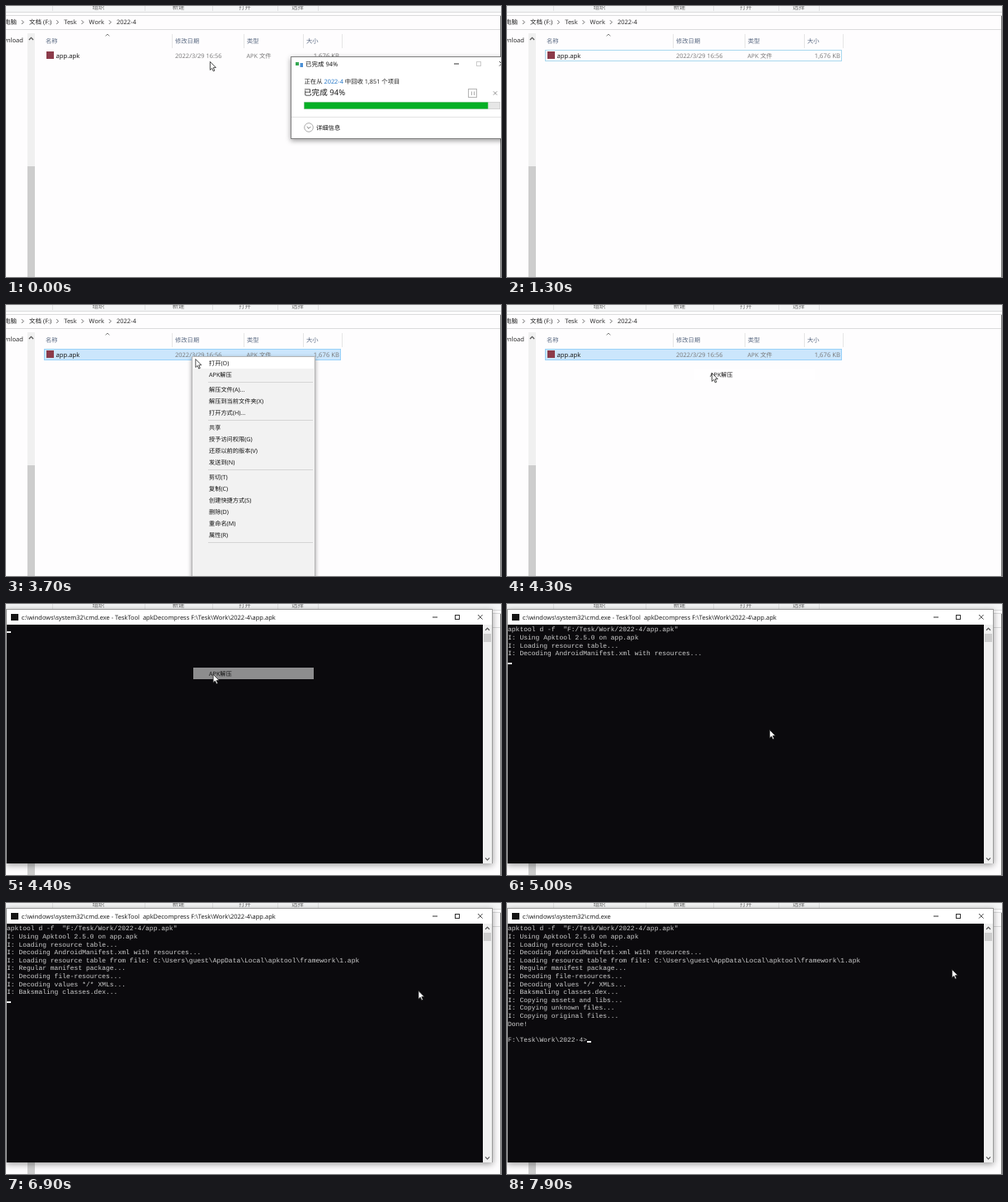
These frames come from a looping animation (600 by 328 pixels, 8000 ms). An HTML page with a canvas:

```html
<!DOCTYPE html>
<html lang="zh-CN">
<head>
<meta charset="utf-8">
<title>APK解压</title>
<style>
html, body { margin: 0; width: 100%; height: 100%; overflow: hidden; background: #fff; }
canvas { display: block; width: 600px; height: 328px; }
</style>
</head>
<body>
<canvas id="stage" width="600" height="328"></canvas>
<script>
const ctx = document.getElementById('stage').getContext('2d');
const LOOP = 8000, STEP = 100;
const UI = '"Open Sans", "Noto Sans CJK SC", "Noto Sans CJK", sans-serif';
const MONO = '"Liberation Mono", monospace';
const LINE = 9.6, CHAR = 4.8, ITEM = 14;
const ARROW = new Path2D('M0 0V10L2.3 7.9 3.9 11.5 5.5 10.8 3.9 7.3 7 7.1Z');

// Pointer stops: time, x, y; it eases from one to the next
const visits = [
  [[0, 247, 67], [600, 248, 60], [1000, 248, 60], [1200, 240, 131]],
  [[2600, 180, 152], [3100, 217, 62], [3600, 226, 62], [4000, 248, 82], [4300, 248, 82], [5200, 328, 162],
   [5700, 331, 166], [6000, 423, 144], [6100, 423, 144], [6600, 497, 107], [7700, 511, 101], [7900, 539, 80]]
];

// Console output in batches; the lines of a batch follow each other at a fixed pace
const batches = [
  { at: 4700, pace: 100, lines: [
    'apktool d -f  "F:/Tesk/Work/2022-4/app.apk"',
    'I: Using Apktool 2.5.0 on app.apk',
    'I: Loading resource table...',
    'I: Decoding AndroidManifest.xml with resources...',
    'I: Loading resource table from file: C:\\Users\\guest\\AppData\\Local\\apktool\\framework\\1.apk'] },
  { at: 5800, pace: 100, lines: ['I: Regular manifest package...', 'I: Decoding file-resources...'] },
  { at: 6200, pace: 400, lines: ['I: Decoding values */* XMLs...', 'I: Baksmaling classes.dex...'] },
  { at: 7200, pace: 50, lines: [
    'I: Copying assets and libs...', 'I: Copying unknown files...', 'I: Copying original files...', 'Done!', ''] }
];
const DONE = 7400;
const PROMPT = 'F:\\Tesk\\Work\\2022-4>';

const menuGroups = [
  ['打开(O)', 'APK解压'],
  ['解压文件(A)...', '解压到当前文件夹(X)', '打开方式(H)...'],
  ['共享', '授予访问权限(G)', '还原以前的版本(V)', '发送到(N)'],
  ['剪切(T)', '复制(C)', '创建快捷方式(S)', '删除(D)', '重命名(M)', '属性(R)']
];

const ease = k => k * k * (3 - 2 * k);

function rect(x, y, w, h, color) {
  ctx.fillStyle = color;
  ctx.fillRect(x, y, w, h);
}

function frame(x, y, w, h, color) {
  ctx.strokeStyle = color;
  ctx.lineWidth = 1;
  ctx.strokeRect(x + .5, y + .5, w - 1, h - 1);
}

function line(points, color, width = .9) {
  ctx.strokeStyle = color;
  ctx.lineWidth = width;
  ctx.beginPath();
  points.forEach(([x, y]) => ctx.lineTo(x, y));
  ctx.stroke();
}

// Chevron around x, y; a negative r points it down
function caret(x, y, r, color, width) {
  line([[x - r, y + r / 2], [x, y - r / 2], [x + r, y + r / 2]], color, width);
}

function cross(x, y, r, color) {
  line([[x - r, y - r], [x + r, y + r]], color);
  line([[x - r, y + r], [x + r, y - r]], color);
}

// Set type at ten times the size and scale down for even spacing; returns the width.
function text(str, x, y, color, size = 7.4, align = 'left', font = UI) {
  ctx.save();
  ctx.translate(x, y);
  ctx.scale(.1, .1);
  ctx.font = `${size * 10}px ${font}`;
  ctx.textRendering = 'geometricPrecision';
  ctx.textAlign = align;
  ctx.fillStyle = color;
  ctx.fillText(str, 0, 0);
  const w = ctx.measureText(str).width / 10;
  ctx.restore();
  return w;
}

function panel(x, y, w, h, fill, edge, blur) {
  ctx.save();
  ctx.shadowColor = 'rgba(0,0,0,.4)';
  ctx.shadowBlur = blur;
  ctx.shadowOffsetY = 2;
  rect(x, y, w, h, fill);
  ctx.restore();
  frame(x, y, w, h, edge);
}

function windowButtons(x, y, maxColor) {
  rect(x - 3, y - .5, 6, 1, '#333');
  frame(x + 24, y - 3, 6, 6, maxColor);
  cross(x + 54.8, y - .2, 2.8, '#333');
}

function explorer(row) {
  rect(0, 0, 600, 328, '#fefdfe');
  rect(0, 0, 600, 7, '#f5f6f7');
  [7, 11, 28].forEach(y => rect(0, y, 600, 1, '#dbdbdc'));

  const tabs = [56, 168, 250, 329, 378];
  tabs.forEach(x => rect(x, 0, 1, 6, '#e0e1e2'));
  ['组织', '新建', '打开', '选择'].forEach((s, i) => text(s, (tabs[i] + tabs[i + 1]) / 2, 3.5, '#666', 7.3, 'center'));

  let x = -9.5;
  ['此电脑', '文档 (F:)', 'Tesk', 'Work', '2022-4'].forEach((s, i) => {
    if (i) line([[x - 9, 17.3], [x - 6.7, 19.6], [x - 9, 21.9]], '#555');
    x += text(s, x, 22.3, '#222', 7.5) + 15;
  });

  text('Download', 21, 43.5, '#222', 7.6, 'right');
  rect(26, 33, 9, 295, '#f0f0f0');
  rect(26, 194, 9, 134, '#cdcdcd');
  caret(30.5, 39.7, 2.6, '#555', 1.2);

  const columns = [44, 201, 288, 360, 407];
  columns.slice(1).forEach(x => rect(x, 34, 1, 17, '#e6e6e6'));
  ['名称', '修改日期', '类型', '大小'].forEach((s, i) => text(s, columns[i] + 4, 44.8, '#5a6a82', 7.3));
  caret(123, 35.2, 2.4, '#777');

  const fill = { hover: '#d8e9f7', selected: '#cbe6fc' }[row];
  const edge = { focus: '#a9d8ee', selected: '#99d1f8' }[row];
  if (fill) rect(46, 53, 360, 14, fill);
  if (edge) frame(46, 53, 360, 14, edge);
  rect(49, 55, 9, 9, '#8c3b4a');
  text('app.apk', 60.5, 62.6, '#111', 7.7);
  text('2022/3/29 16:56', 205, 62.6, '#777', 7.5);
  text('APK 文件', 291.5, 62.6, '#777', 7.3);
  text('1,676 KB', 404, 62.6, '#777', 7.7, 'right');
}

function dialog(t) {
  ctx.save();
  ctx.globalAlpha = t < 400 ? 1 : .4;
  panel(345, 61, 265, 100, '#fff', '#808080', 6);
  rect(351, 68, 4, 4, '#35a853');
  rect(356.5, 69, 3.5, 5, '#4b8fd6');
  text('已完成 94%', 363, 73, '#111', 7.5);
  windowButtons(546, 70, '#ccc');

  let x = 361.5;
  ['正在从 ', '2022-4', ' 中回收 1,851 个项目'].forEach((s, i) => {
    x += text(s, x, 94.3, i === 1 ? '#1a70c5' : '#222', 7.36);
  });
  text('已完成 94%', 361, 108, '#111', 9.6);
  frame(560, 100, 11, 11, '#b5b5b5');
  [564, 567].forEach(x => rect(x, 103.5, .8, 4.5, '#999'));
  cross(593, 105.5, 2.2, '#888');

  const done = Math.min(1, .94 + .03 * t / STEP);
  rect(361, 116, 238, 9, '#c4c4c4');
  rect(361.5, 116.5, 237, 8, '#e6e6e6');
  rect(361.5, 116.5, 237 * done, 8, '#06b025');
  rect(346, 134, 254, 1, '#e3e3e3');
  ctx.strokeStyle = '#999';
  ctx.lineWidth = .8;
  ctx.beginPath();
  ctx.arc(367, 147, 5.3, 0, 7);
  ctx.stroke();
  caret(367, 147.2, -2.3, '#666');
  text('详细信息', 376, 149.8, '#111', 7.3);
  ctx.restore();
}

function menu(t) {
  panel(225, 62, 150, 280, '#f2f2f2', '#b5b5b5', 5);
  rect(227, 63 + (t < 3800 ? 0 : ITEM), 146, ITEM, '#fff');
  let y = 63;
  menuGroups.forEach(group => {
    group.forEach(s => {
      text(s, 246, y + 9.7, '#111', 7.2);
      y += ITEM;
    });
    rect(245, y + 2, 127, 1, '#d5d5d5');
    y += 4;
  });
}

// The chosen menu entry lingers and fades
function chosenItem(t) {
  const left = 1 - (t - 4300) / 300;
  ctx.save();
  ctx.globalAlpha = left * .8;
  rect(227, 77, 146, ITEM, '#fff');
  ctx.globalAlpha = Math.min(.9, left * 1.3);
  text('APK解压', 246, 86.7, '#000', 7.2);
  ctx.restore();
}

function terminal(t) {
  panel(0, 6, 590, 308, '#fff', '#9a9a9a', 8);
  rect(6, 12, 9, 8, '#151515');
  const job = t < DONE ? ' - TeskTool  apkDecompress F:\\Tesk\\Work\\2022-4\\app.apk' : '';
  text('c:\\windows\\system32\\cmd.exe' + job, 18.7, 18.6, '#111', 7.5);
  windowButtons(520, 16, '#333');

  rect(1, 25, 577, 289, '#0b0a0d');
  rect(578, 25, 11, 289, '#f0f0f0');
  rect(579, 36, 9, 10, '#cdcdcd');
  caret(583.5, 30.5, 2.5, '#555', 1.1);
  caret(583.5, 308.7, -2.5, '#555', 1.1);

  const lines = batches.flatMap(b => b.lines.filter((s, i) => t >= b.at + i * b.pace));
  if (t >= DONE) lines.push(PROMPT);
  lines.forEach((s, i) => text(s, 1, 33.4 + LINE * i, '#cfcfcf', 8, 'left', MONO));
  const [col, row] = t < DONE ? [0, lines.length] : [PROMPT.length, lines.length - 1];
  rect(1 + CHAR * col, Math.round(32.5 + LINE * row), 5, 2, '#f2f2f2');
}

function pointer(t) {
  const stops = visits.find(v => t >= v[0][0] && t <= v[v.length - 1][0]);
  if (!stops) return;
  const i = Math.max(1, stops.findIndex(s => s[0] >= t));
  const [t0, x0, y0] = stops[i - 1], [t1, x1, y1] = stops[i];
  const k = ease((t - t0) / (t1 - t0));
  ctx.save();
  ctx.translate(x0 + (x1 - x0) * k + .4, y0 + (y1 - y0) * k + .4);
  ctx.fillStyle = '#fff';
  ctx.fill(ARROW);
  ctx.strokeStyle = '#222';
  ctx.lineWidth = .8;
  ctx.stroke(ARROW);
  ctx.restore();
}

function rowState(t) {
  if (t < 500) return '';
  if (t >= 3500) return 'selected';
  return t < 1100 || t >= 3000 ? 'hover' : 'focus';
}

function draw(now) {
  const t = Math.floor(now % LOOP / STEP) * STEP;
  explorer(rowState(t));
  rect(599, 12, 1, 316, '#777');
  if (t < 500) dialog(t);
  if (t >= 3600 && t < 4300) menu(t);
  if (t >= 4400) terminal(t);
  if (t >= 4300 && t < 4600) chosenItem(t);
  pointer(t);
}

const start = performance.now();
function tick() {
  draw(performance.now() - start);
  requestAnimationFrame(tick);
}
tick();
</script>
</body>
</html>
```
